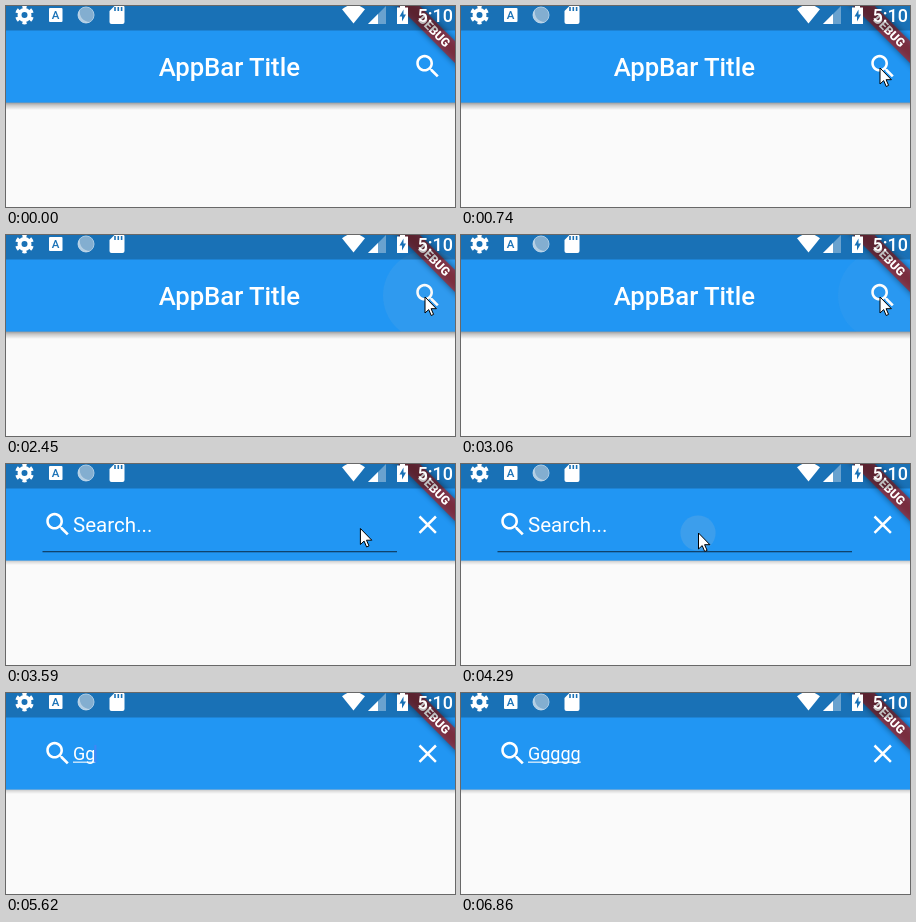
Recreate the animation shown at these times as an HTML page. Size 449 by 201 pixels, loop 7.32 s.

```html
<!DOCTYPE html>
<html lang="en">
<head>
<meta charset="utf-8">
<title>App bar search</title>
<style>
  html, body { margin: 0; width: 100%; height: 100%; overflow: hidden; background: #fafafa; }
  svg { display: block; width: 100%; height: 100%; }
  text { font-family: Roboto, sans-serif; fill: #fff; white-space: pre; }
</style>
</head>
<body>
<svg viewBox="0 0 449 201">
  <defs>
    <linearGradient id="shade" x2="0" y2="1">
      <stop stop-opacity=".42"/>
      <stop offset=".4" stop-opacity=".2"/>
      <stop offset="1" stop-opacity="0"/>
    </linearGradient>
    <clipPath id="barClip"><rect width="449" height="96.6"/></clipPath>
    <clipPath id="fieldClip"><rect x="36.4" y="33" width="354.6" height="56"/></clipPath>
    <path id="lens" fill="#fff" transform="scale(1.286)" d="M15.5 14h-.79l-.28-.27C15.41 12.59 16 11.11 16 9.5 16 5.91 13.09 3 9.5 3S3 5.91 3 9.5 5.91 16 9.5 16c1.61 0 3.09-.59 4.23-1.57l.27.28v.79l5 4.99L20.49 19l-4.99-5zm-6 0C7.01 14 5 11.99 5 9.5S7.01 5 9.5 5 14 7.01 14 9.5 11.99 14 9.5 14z"/>
  </defs>

  <rect width="449" height="201" fill="#fafafa"/>
  <rect id="shadow" y="96" width="449" fill="url(#shade)"/>
  <rect width="449" height="96.6" fill="#2196f3"/>

  <g id="titleView">
    <text x="152.7" y="70" font-size="25.7" font-weight="500">AppBar Title</text>
    <use href="#lens" x="406.4" y="45"/>
  </g>

  <g id="searchView">
    <g clip-path="url(#fieldClip)"><circle id="splash" cx="237" cy="69" fill="#c8c8c8"/></g>
    <use href="#lens" x="36.4" y="45"/>
    <rect id="underline" x="36.5" y="87" width="354.5" height="1.3"/>
    <text id="hint" x="67" y="68" font-size="20.57">Search...</text>
    <text id="typed" x="67" y="67" font-size="18"></text>
    <rect id="composing" x="67" y="68.6" height="1.1" fill="#fff"/>
    <rect id="caret" y="52" width="2" height="17.5" fill="#4285f4"/>
    <path d="M413.5 52.5l16.4 16.4m0-16.4l-16.4 16.4" stroke="#fff" stroke-width="2.5"/>
  </g>

  <g clip-path="url(#barClip)"><circle id="ripple" cx="422" cy="60.5" fill="#c8c8c8"/></g>

  <g transform="translate(427.5 24.5) rotate(45)">
    <rect x="-51" y="-7.7" width="102" height="15.4" opacity=".5" style="filter: blur(3px)"/>
    <rect x="-51" y="-7.7" width="102" height="15.4" fill="#b71c1c" opacity=".627"/>
    <text x="1" y="4" font-size="12.2" font-weight="900" text-anchor="middle">DEBUG</text>
  </g>

  <!-- status bar -->
  <rect width="449" height="24.5" opacity=".25"/>
  <g fill="none" stroke="#fff">
    <circle cx="18.5" cy="9" r="5" stroke-width="4"/>
    <circle cx="18.5" cy="9" r="7.7" stroke-width="3.4" pathLength="12" stroke-dasharray="1" stroke-dashoffset="-.5"/>
  </g>
  <rect x="43" y="2" width="13.5" height="14" rx="1" fill="#fff"/>
  <text x="49.7" y="13" font-size="11.5" font-weight="500" text-anchor="middle" style="fill: #1971b6">A</text>
  <circle cx="80" cy="9" r="8" fill="#83aed0" stroke="#a9cbe6"/>
  <path d="M74 4a8 8 0 0 0 10 12a10 10 0 0 1-10-12" fill="#fff" opacity=".4"/>
  <path d="M109-.5h7.5q2 0 2 2v14.5q0 2-2 2h-11q-2 0-2-2V5z" fill="#fff"/>
  <path d="M109 1v4m3.3-4v4m3.3-4v4" stroke="#1971b6" stroke-width="1.6"/>
  <path d="M347.5 17.5L336 3.3Q347.5-6 359 3.3z" fill="#fff"/>
  <path d="M362 18h18V0z" fill="#fff" opacity=".35"/>
  <path d="M362 18h10V8z" fill="#fff"/>
  <path d="M391 1.5h3V-1h5v2.5h3V18h-11z" fill="#fff"/>
  <path d="M397.5 3.5l-4 7h2.5v5l4-7h-2.5z" fill="#1971b6"/>
  <text x="411.5" y="16" font-size="18" font-weight="500">5:10</text>

  <path id="pointer" d="M0 0V16L3.7 12.6 6.2 18.5 8.6 17.4 6.1 11.7H11.4Z" fill="#fff" stroke="#000"/>
</svg>
<script>
const LOOP = 7320, STEP = 77;
const TAPS = [1520, 2290, 3060];
const FIELD_TAP = 4220, TYPING = 5390, LETTER = 175, BLINK = 490;
const POINTER_IN = 130, POINTER_OUT = 4760;
const ENTRY = { x: 376, y: 182 };
const MOVES = [
  { start: 130, end: 360, x: 430, y: 52 },
  { start: 360, end: 440, x: 412, y: 38 },
  { start: 510, end: 740, x: 419, y: 62 },
  { start: 3510, end: 3900, x: 237.5, y: 69 }
];

const $ = id => document.getElementById(id);
const set = (id, attrs) => Object.entries(attrs).forEach(([name, value]) => $(id).setAttribute(name, value));
const show = (id, on) => $(id).style.display = on ? '' : 'none';
const clamp = v => Math.min(1, Math.max(0, v));
const fade = (t, start, end) => 1 - clamp((t - start) / (end - start));
const easeOut = p => 1 - (1 - p) ** 2;
const mix = (a, b, p) => a + (b - a) * p;
const elapsed = (t, start) => Math.floor((t - start + 8) / STEP) * STEP;

function pointerAt(t) {
  let { x, y } = ENTRY;
  for (const move of MOVES) {
    if (t < move.start) break;
    const p = easeOut(clamp(elapsed(t, move.start) / (move.end - move.start)));
    x = mix(x, move.x, p);
    y = mix(y, move.y, p);
  }
  return `translate(${x} ${y})`;
}

function drawRipple(t) {
  const tap = TAPS.findLast(start => start <= t);
  const phase = tap ? (elapsed(t, tap) + STEP) / (5 * STEP) : 1;
  set('ripple', { r: 45, opacity: phase < 1 ? 0.09 * Math.sin(Math.PI * phase) : 0 });
}

function drawField(t) {
  const age = elapsed(t, FIELD_TAP);
  const splashing = age >= 0 && age < 4 * STEP;
  set('splash', { r: splashing ? 12 + 170 * (age / 240) ** 3 : 0, opacity: 0.16 });
  set('underline', { opacity: 0.55 * fade(t, 4420, 4530) });
  set('hint', { opacity: fade(t, TYPING - STEP, TYPING + 2 * STEP) });

  const count = Math.max(0, 1 + Math.floor((t - TYPING) / LETTER));
  $('typed').textContent = 'Ggggg'.slice(0, count);
  const width = count ? $('typed').getComputedTextLength() : 0;
  set('composing', { width });
  set('caret', { x: 67 + Math.max(0, width - 1) });
  show('caret', t >= 4530 && Math.floor((TYPING - t) / BLINK) % 2 !== 0 === (t > TYPING));
}

function draw(t) {
  const searching = TAPS.filter(tap => t >= tap + STEP).length % 2 === 1;
  show('titleView', !searching);
  show('searchView', searching);
  set('shadow', { height: searching ? 5 : 8, opacity: searching ? 0.6 : 1 });
  drawRipple(t);
  drawField(t);
  show('pointer', t >= POINTER_IN && t < POINTER_OUT);
  set('pointer', { transform: pointerAt(t) });
}

const start = performance.now();
function tick() {
  draw((performance.now() - start) % LOOP);
  requestAnimationFrame(tick);
}
tick();
</script>
</body>
</html>
```
